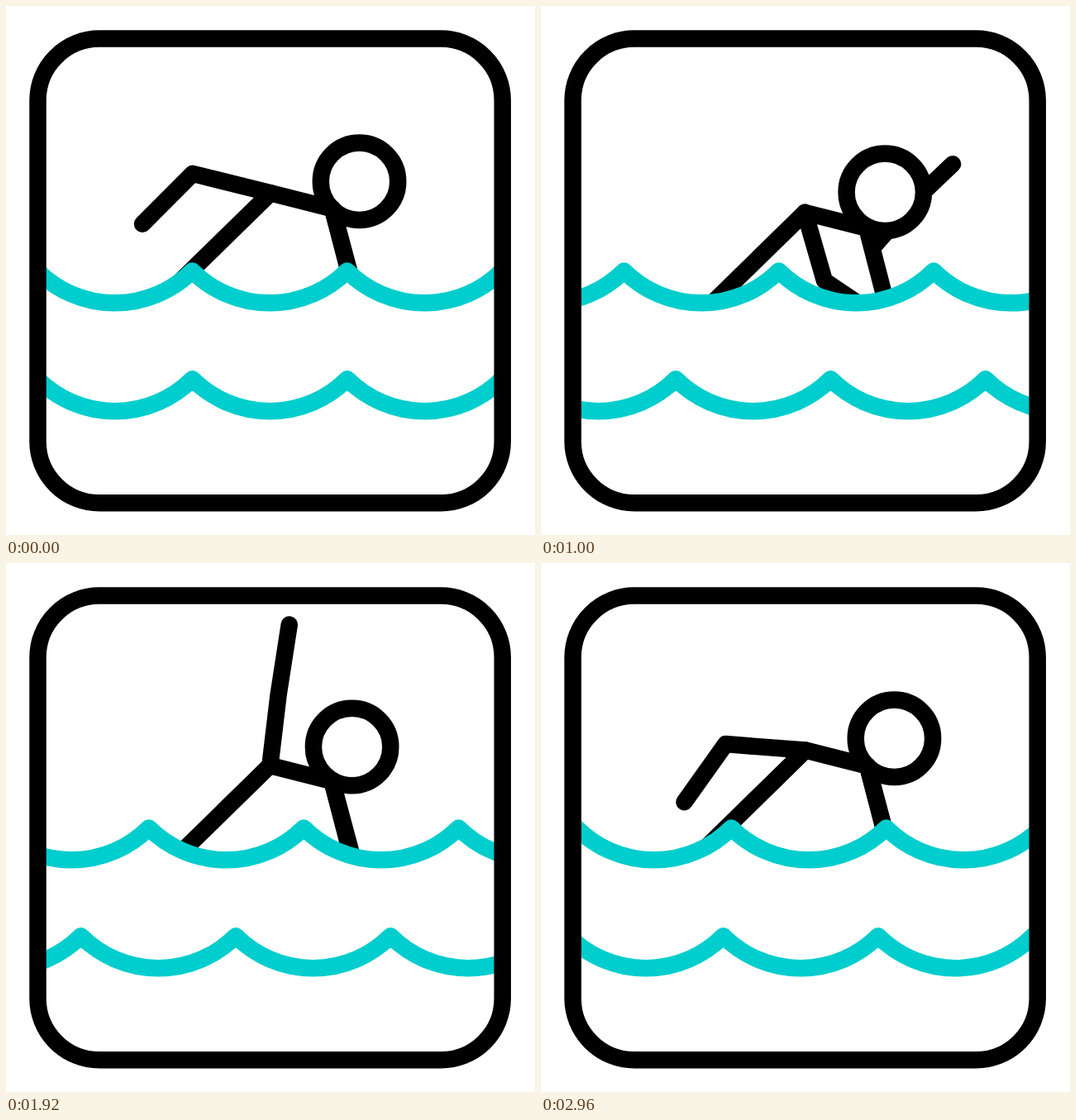
These frames come from a looping animation (640 by 640 pixels, 3000 ms). An HTML page:

```html
<!DOCTYPE html>
<html lang="en">
<head>
<meta charset="utf-8">
<title>Swimmer</title>
<style>
  html, body { margin: 0; width: 100%; height: 100%; overflow: hidden; background: #fff; }
  svg { display: block; width: 100vw; height: 100vh; }
  path, circle, rect.frame { fill: none; stroke: #000; stroke-width: 20.5; stroke-linecap: round; stroke-linejoin: round; }
  #head { fill: #fff; }
  .wave { fill: #fff; stroke: #00cdcd; }
</style>
</head>
<body>
<svg viewBox="0 0 640 640">
  <clipPath id="pool"><rect x="39" y="39" width="562" height="562"/></clipPath>
  <g clip-path="url(#pool)">
    <path id="farArm"/>
    <circle id="head" r="46.7"/>
    <path id="body" d="M180 137 L320 0 L395 19 L426 139"/>
    <path id="nearArm"/>
    <path id="upper" class="wave"/>
    <path id="lower" class="wave"/>
  </g>
  <rect class="frame" x="38.5" y="39.6" width="562.2" height="561.6" rx="74.5"/>
</svg>
<script>
const STROKE = 1500, STEP = 40, CREST = 562 / 3;
const el = id => document.getElementById(id);
const move = (id, x, y) => el(id).setAttribute('transform', `translate(${x} ${y})`);

// Smooth 0 to 1 between two times
function ramp(t, from, to) {
  const s = Math.min(1, Math.max(0, (t - from) / (to - from)));
  return s * s * (3 - 2 * s);
}

// Angles are degrees clockwise from straight up.
function drawArm(id, x, y, upper, upperLen, fore, foreLen) {
  const reach = (p, angle, len) => {
    const r = angle * Math.PI / 180;
    return [p[0] + len * Math.sin(r), p[1] - len * Math.cos(r)];
  };
  const elbow = reach([x, y], upper, upperLen);
  const hand = reach(elbow, fore, foreLen);
  el(id).setAttribute('d', `M${x} ${y} L${elbow} L${hand}`);
}

// Steady turn; the elbow straightens out of the water and bends again under it.
function drawNearArm(t, x, y) {
  const turn = 360 * t / STROKE;
  const out = ramp(t, 0, 60);
  const lift = out - ramp(t, 680, 860);
  const stretch = out - ramp(t, 1000, 1460);
  drawArm('nearArm', x, y,
    284 + turn - 18 * lift, 97 - 11 * stretch,
    225 + turn + 24 * lift + 19 * stretch, 86);
}

// Rests along the body, then swings round quickly with a trailing forearm.
function drawFarArm(t, x, y) {
  const swing = Math.min(1, Math.max(0, (t - 420) / 1040)) ** 0.72;
  const flick = ramp(t, 0, 60) - ramp(t, 60, 420);
  const angle = 165 + 360 * swing - 8 * flick;
  const trail = ramp(t, 420, 560) - ramp(t, 880, 1000);
  const back = ramp(t, 1000, 1460);
  const lean = ramp(t, 680, 860) - back;
  const tuck = ramp(t, 880, 1000) - back;
  drawArm('farArm', x + 9 * lean, y + 21 * lean,
    angle, 58 + 12 * lean,
    angle - 36 * trail + 5 * tuck, 83 - 16 * tuck);
}

function shapeWave(id, y) {
  const arcs = `a132.3 132.3 0 0 0 ${CREST} 0`.repeat(6);
  el(id).setAttribute('d', `M${-2 * CREST} ${y}${arcs}V900H${-2 * CREST}Z`);
}

function draw(now) {
  const t = Math.floor(now % (2 * STROKE) / STEP) * STEP % STROKE;
  const drift = t / STROKE * CREST;
  move('upper', 225.3 - drift, 0);
  move('lower', 225.5 + drift - CREST, 0);

  const dip = (1 - Math.cos(t / STROKE * 2 * Math.PI)) / 2;
  const x = -dip, y = 226.3 + 31.4 * dip;
  move('body', x, y);
  move('head', 427.5 - 15 * dip, 212.2 + 17.4 * dip);
  drawNearArm(t, 320 + x, y);
  drawFarArm(t, 395 + x, y + 19);
}

shapeWave('upper', 320.5);
shapeWave('lower', 451.3);
const start = performance.now();
function tick() {
  draw(performance.now() - start);
  requestAnimationFrame(tick);
}
tick();
</script>
</body>
</html>
```
